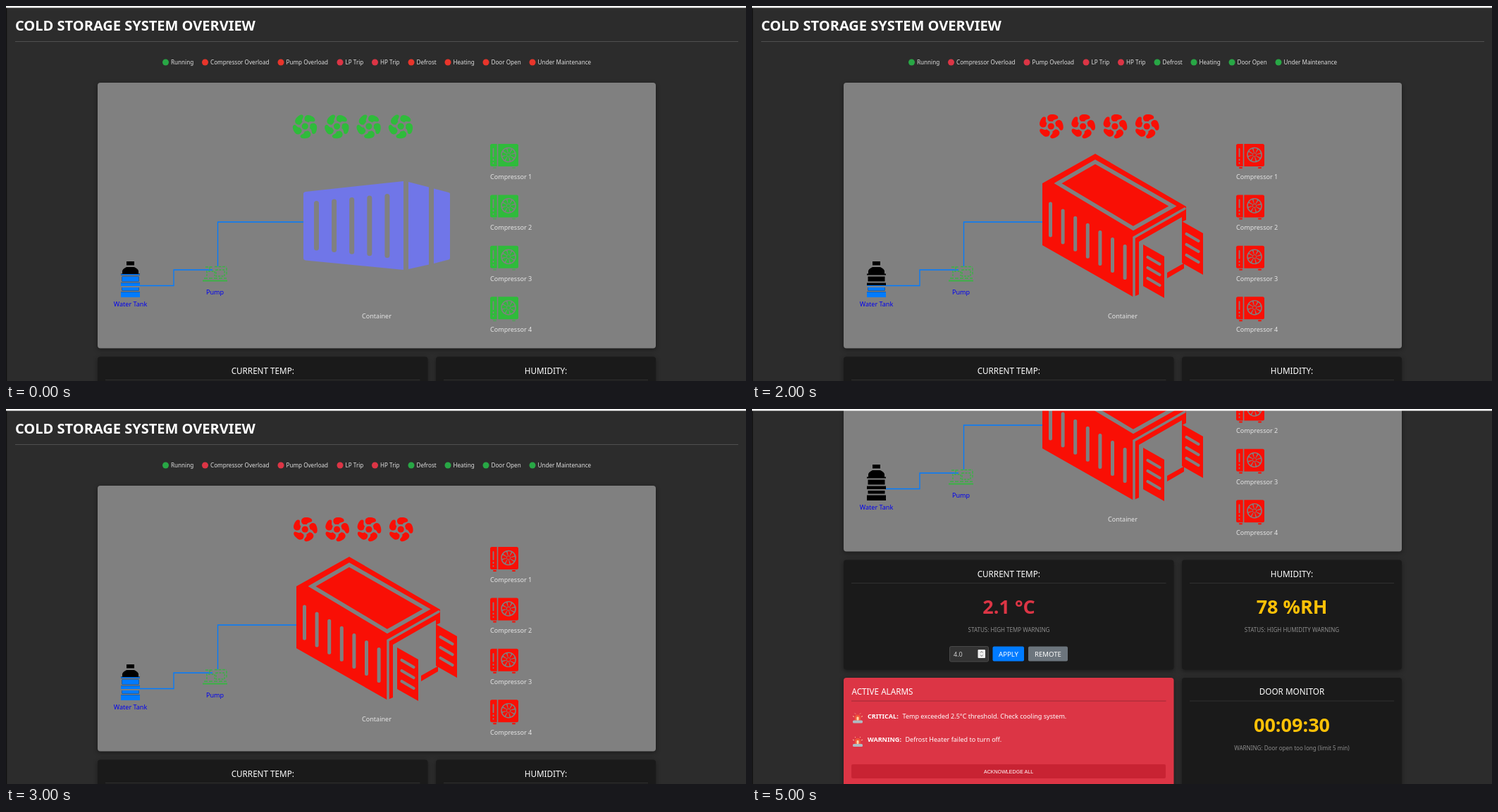
An HTML page that plays this animation: 1050x533 px, repeating every 6 s.

```html
<!DOCTYPE html>
<html lang="en">
<head>
<meta charset="utf-8">
<title>Cold storage overview</title>
<style>
  html, body { margin: 0; width: 100%; height: 100%; overflow: hidden; background: #2c2c2c; }
  svg { display: block; width: 1050px; height: 533px; font: 9.05px "Noto Sans", sans-serif; }
  .mid { text-anchor: middle; }
  .head { font-size: 11.7px; fill: #fff; }
  .big { font-size: 27px; font-weight: 700; }
  .status { font-size: 8.05px; fill: #8c8c8c; }
  .button { font-size: 9.6px; fill: #fff; }
  .shadow { filter: drop-shadow(0 2px 3px #0006); }
  .gap { fill: none; stroke: #808080; stroke-linecap: round; }
</style>
</head>
<body>
<svg viewBox="0 0 1050 533"></svg>
<script>
const GREEN = '#2fbb3b', RED = '#f90f05', GRAY = '#808080', WATER = '#007bff';
const LAMPS = { g: '#28a745', r: '#dc3545', o: '#e8352b' };
const LEGEND = [['Running', 226.5], ['Compressor Overload', 282.5], ['Pump Overload', 390],
  ['LP Trip', 474], ['HP Trip', 523.5], ['Defrost', 575], ['Heating', 627],
  ['Door Open', 681], ['Under Maintenance', 747]];

// One state per second; on = first running unit, level = top of the water
const normal = { open: false, on: 0, spin: 22, level: 381, lamps: 'goorroooo', scroll: 0 };
const alarm = { ...normal, open: true, on: 4, lamps: 'grrrrgggg' };
const STATES = [
  normal,
  { ...normal, on: 2, spin: 4, level: 415, lamps: 'gooroorog' .slice(0, 3) + 'rooroo' },
  { ...alarm, level: 397 },
  alarm,
  { ...normal, spin: 16, level: 362, lamps: alarm.lamps },
  { ...alarm, level: 415, scroll: 284 }
];

const repeat = (n, draw) => Array.from({ length: n }, (_, i) => draw(i)).join('');
const text = (x, y, str, cls = '', fill = '') =>
  `<text x="${x}" y="${y}" class="${cls}"${fill && ` fill="${fill}"`}>${str}</text>`;
const rect = (x, y, w, h, fill, r = 0, extra = '') =>
  `<rect x="${x}" y="${y}" width="${w}" height="${h}" rx="${r}" fill="${fill}" ${extra}/>`;
const path = (d, fill, extra = '') => `<path d="${d}" fill="${fill}" ${extra}/>`;
const gap = (d, width) => `<path d="${d}" class="gap" stroke-width="${width}"/>`;
const rule = (x1, x2, y, color) => `<path d="M${x1} ${y}H${x2}" stroke="${color}"/>`;

function fan(x, running, spin) {
  const blade = 'M-2.5-7C-7-10-6-17 1-17C7-17 10.5-15 10-12C9-9 4-11 2.5-7Z';
  return `<g transform="translate(${x} 171) rotate(${running ? spin : 0})" fill="${running ? GREEN : RED}">
    <circle r="4.6"/>${repeat(5, i => `<path d="${blade}" transform="rotate(${i * 72})"/>`)}</g>`;
}

function compressor(i, running) {
  const color = running ? GREEN : RED, y = 196 + i * 72.4;
  return `<g transform="translate(687 ${y})">
    ${rect(0, 0, 40, 32, color, 2.5)}
    <g opacity="${running ? .5 : 1}">${rect(4, 33, 5, 2, color, 1)}${rect(31, 33, 5, 2, color, 1)}</g>
    ${gap('M10.5 0V32', 1.6)}${gap('M4.5 7V18M4.5 22V23M4.5 27V27.5', 1.8)}
    <circle cx="26" cy="15.5" r="10.8" fill="${GRAY}"/>
    <g transform="translate(26 15.5)" fill="${color}"><circle r="2.2"/>
    ${repeat(8, k => `<path d="M-.8-2.8L-3-8.7Q0-10 2.4-8.8L.9-2.8Z" transform="rotate(${k * 45 + 10})"/>`)}</g>
    </g>${text(687, y + 50, 'Compressor ' + (i + 1), '', '#e4e4e4')}`;
}

function closedContainer() {
  return path('M425 264L564 249V375L425 361.500Q422 361 422 358V267Q422 264.500 425 264ZM571 250L600 257.500V367.500L571 374ZM607 259.500L628 265Q630 265.500 630 267V358Q630 360 628 360.500L607 366Z', '#7076e8')
    + repeat(5, i => gap(`M${440.5 + i * 25.1} ${280.5 - i * 2.5}V${344 + i * 2.6}`, 7));
}

function openContainer() {
  const door = (x, y) => path(`M${x} ${y}l30 17v59l-30-17Z`, RED)
    + repeat(3, i => gap(`M${x + 6.5} ${y + 18 + i * 15}l17 10`, 4.2));
  return path('M412 252L487 210L616 285V304L610 307V300L549 335V410L541 413.500L412 340Z', RED)
    + gap('M434 252L487 221.500L597 284.500L541 316Z', 5.5)
    + gap('M542 413V329L614 288', 3.5)
    + repeat(7, i => gap(`M${423.5 + i * 17.6} ${281 + i * 10.1}v45`, 5))
    + path('M589 379L613 365.500V373L589 387Z', RED)
    + door(610, 306) + door(555, 339);
}

function tank(level) {
  const shape = 'M171 363h11v5.500h-11ZM165 380.500V377Q165 374 171 371H182Q188 374 188 377V380.500H190V382.500H163V380.500Z'
    + [384.5, 393.5, 400, 406.5].map((y, i) =>
      `M${i % 2 ? 163 : 164.5} ${y}H${i % 2 ? 190 : 188.5}V${[391.5, 398, 404.5, 414][i]}H${i % 2 ? 163 : 164.5}Z`).join('');
  return `<clipPath id="water">${rect(160, level, 34, 60, '#000')}</clipPath>`
    + path(shape, '#000') + path(shape, WATER, 'clip-path="url(#water)"')
    + text(176.5, 427, 'Water Tank', 'mid', '#0000f0');
}

function pump() {
  return `<g fill="none" stroke="${GREEN}" stroke-width="1.4" opacity=".85">
    <path d="M283 371H294M289 371V376M296 370.500H313M313 372V382" stroke-dasharray="4 1.500"/>
    <path d="M285 384V377H296V384M298 375H310V384H298Z" stroke-dasharray="3 1.500"/>
    <path d="M281 387H313" stroke-dasharray="5 2"/><path d="M279 390.500H314" stroke-width="2"/></g>`
    + text(296.5, 410, 'Pump', 'mid', '#0000f0');
}

function card(x, y, w, h, title, fill = '#1a1a1a', line = '#303030') {
  const left = fill !== '#1a1a1a';
  return rect(x, y, w, h, fill, 4, 'class="shadow"')
    + text(left ? x + 11.5 : x + w / 2, y + 24, title, left ? 'head' : 'head mid')
    + rule(x + 11, x + w - 11, y + 33, line);
}

function alarmRow(y, level, message, x) {
  return `<g transform="translate(150 ${y})">${path('M-4 3V-1Q-4-5 0-5T4-1V3Z', '#f0563a')}
    ${rect(-7, 3, 14, 4, '#aebbc3', 1.5)}${rect(-1.5, -2, 3, 5, '#ffd7a8', 1)}
    <path d="M-7-3L-5-2M7-3L5-2M-4-7L-3-6M4-7L3-6" stroke="#ffc9a0"/></g>`
    + text(164, y, level, '" font-weight="700', '#fff') + text(x, y, message, '', '#fff');
}

const cards = card(130, 498.5, 468.5, 156, 'CURRENT TEMP:')
  + text(364.5, 575, '2.1 °C', 'big mid', '#dc3545')
  + text(364.5, 601, 'STATUS: HIGH TEMP WARNING', 'status mid')
  + rect(280.5, 621.5, 55, 21.5, '#333', 2, 'stroke="#4a4a4a"')
  + text(286, 635.5, '4.0', '', '#ccc') + rect(320.5, 626, 10.5, 12, '#eee', 1)
  + '<path d="M324 630.500l1.800-2 1.800 2M324 633.500l1.800 2 1.800-2" fill="none" stroke="#777"/>'
  + rect(341.5, 621.5, 44.5, 21, WATER, 2) + text(364, 635.5, 'APPLY', 'button mid')
  + rect(392, 621.5, 56, 21, '#6c757d', 2) + text(420, 635.5, 'REMOTE', 'button mid')
  + card(610, 498.5, 312, 156, 'HUMIDITY:')
  + text(766, 575, '78 %RH', 'big mid', '#ffc107')
  + text(766, 601, 'STATUS: HIGH HUMIDITY WARNING', 'status mid')
  + card(130, 666, 468.5, 170, 'ACTIVE ALARMS', '#dc3545', '#9c2b37')
  + alarmRow(723.5, 'CRITICAL:', 'Temp exceeded 2.5°C threshold. Check cooling system.', 213.5)
  + alarmRow(757, 'WARNING:', 'Defrost Heater failed to turn off.', 217.5)
  + rect(141, 789, 446, 20, '#c82333', 2)
  + `<text x="364" y="801.500" class="mid" fill="#fff" style="font:7.1px 'Liberation Sans',sans-serif">ACKNOWLEDGE ALL</text>`
  + card(610, 666, 312, 170, 'DOOR MONITOR')
  + text(766, 743, '00:09:30', 'big mid', '#ffc107')
  + text(766, 769, 'WARNING: Door open too long (limit 5 min)', 'status mid');

function scene(s) {
  const legend = LEGEND.map(([name, x], i) =>
    `<circle cx="${x}" cy="80" r="4.5" fill="${LAMPS[s.lamps[i]]}"/>`
    + `<text x="${x + 7.5}" y="83" fill="#ddd" font-size="8.150">${name}</text>`).join('');
  return `<g transform="translate(0 ${-s.scroll})">
    <text x="13" y="35" fill="#fff" font-size="20" font-weight="700">COLD STORAGE SYSTEM OVERVIEW</text>
    ${rule(13, 1039, 50.5, '#505050')}${legend}
    ${rect(130, 109, 792, 377.5, GRAY, 4, 'class="shadow"')}
    ${repeat(4, i => fan(424.3 + i * 45.3, i >= s.on, s.spin))}
    ${repeat(4, i => compressor(i, i >= s.on))}
    <path d="M190 397.500H238V375H293M300.500 370V307H424" fill="none" stroke="${WATER}" stroke-width="1.300"/>
    ${s.open ? openContainer() : closedContainer()}
    ${text(526, 444, 'Container', 'mid', '#e4e4e4')}
    ${tank(s.level)}${pump()}${cards}</g>
    ${rect(0, 0, 1.3, 533, '#111')}${rect(0, 0, 1050, 2.5, '#fff')}`;
}

const stage = document.querySelector('svg');
let shown = -1;
function tick() {
  const step = Math.floor(performance.now() / 1000) % STATES.length;
  if (step !== shown) stage.innerHTML = scene(STATES[shown = step]);
  requestAnimationFrame(tick);
}
tick();
</script>
</body>
</html>
```
